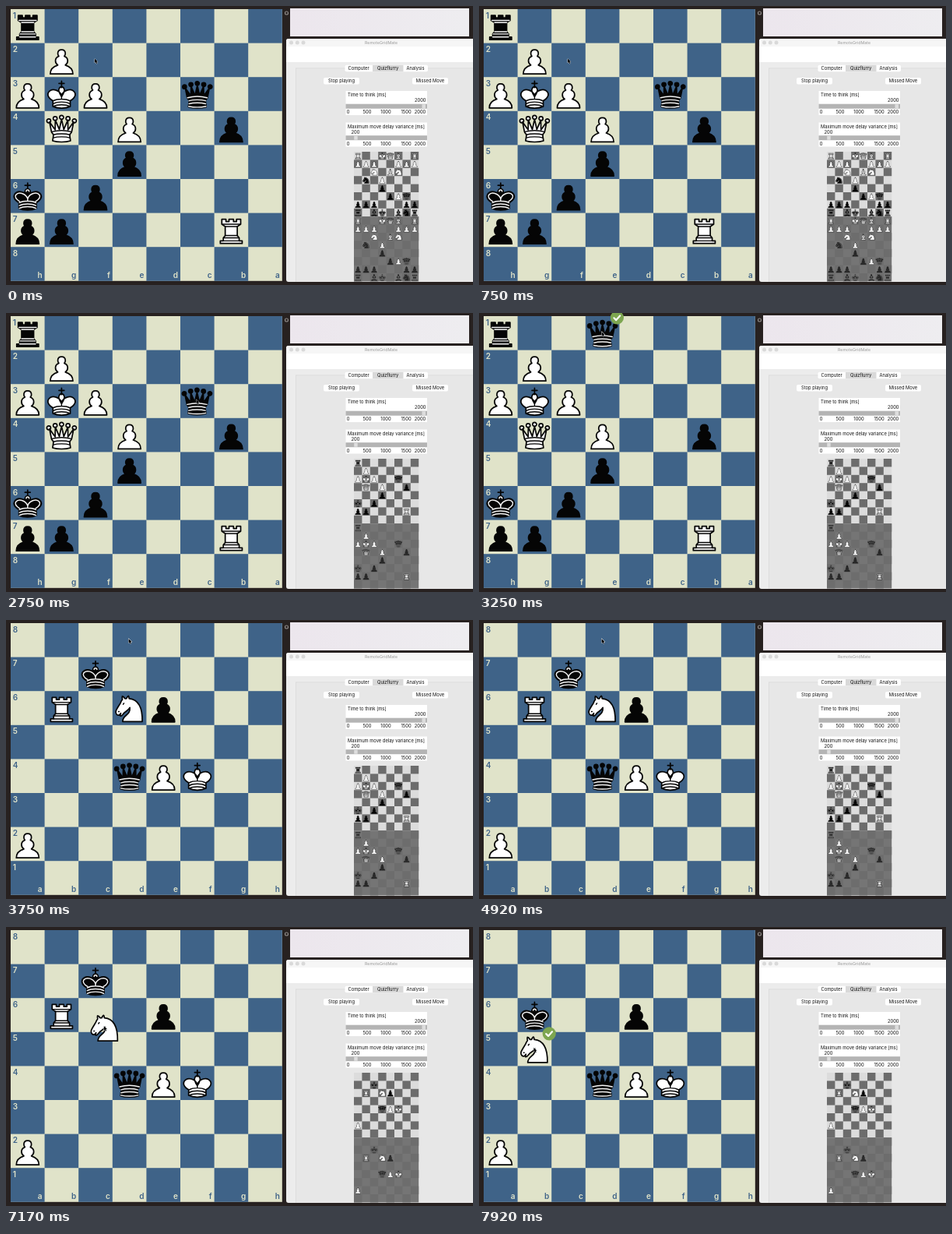
An HTML page with a canvas for the animation above (8000 ms loop, 600 by 358 pixels).

```html
<!DOCTYPE html>
<html lang="en">
<head>
<meta charset="utf-8">
<title>Chess helper</title>
<style>
  html, body { margin: 0; width: 100%; height: 100%; overflow: hidden; background: #272120; }
  canvas { display: block; width: 600px; height: 358px; }
</style>
</head>
<body>
<canvas id="stage" width="600" height="358"></canvas>
<script>
const ctx = document.getElementById('stage').getContext('2d');
const LOOP = 8000;
const BOARD = { x: 6, y: 4, cell: 43.6 };
const LIGHT = '#e0e3c9', BLUE = '#3f6388';
const FONT = 'Inter, "Liberation Sans", sans-serif';

const OPENING = 'R2KQB1R/PPP2PPP/2N1BN2/1n1P4/3p4/4pPq1/ppp3pp/r1bk1bnr';
const FIRST = 'r7/1P6/PKP2q2/1Q1P2p1/3p4/k1p5/pp4R1/8';
const SECOND = '8/2k5/1R1Np3/8/3qPK2/8/P7/8';

// Piece outlines on a 45 unit square: body, lines on both colours, lines on black only.
const ball = (x, y, r = 2.6) => `M${x - r},${y}a${r},${r} 0 1 0 ${2 * r},0a${r},${r} 0 1 0 ${-2 * r},0Z`;
const piece = (body, lines = '', blackLines = '') =>
  ({ body: new Path2D(body), lines: new Path2D(lines), blackLines: new Path2D(blackLines) });
const PIECES = {
  p: piece('M22.5,8C19.5,8 17.5,10 17.5,13C17.5,14.3 18,15.5 18.9,16.4C16,17.6 14.4,20 14.4,22.6C14.4,25 15.6,27 17.5,28.2C11.5,30 7.5,33.5 7.5,40H37.5C37.5,33.5 33.5,30 27.5,28.2C29.4,27 30.6,25 30.6,22.6C30.6,20 29,17.6 26.1,16.4C27,15.5 27.5,14.3 27.5,13C27.5,10 25.5,8 22.5,8Z'),
  r: piece('M8,39.5V36H12V32L14.5,29V17L10,14V7.5H15.5V10.5H19.5V7.5H25.5V10.5H29.5V7.5H35V14L30.5,17V29L33,32V36H37V39.5Z',
    'M12,36H33M12.5,32H32.5M14.5,29H30.5M14.5,17H30.5M11,14H34'),
  n: piece('M22,9C33,10 40,18 39.5,39.5H13.5C13.5,30 24,32 23,21C21,25 17,26 15.5,28C13.5,30 12.5,32.5 10.5,32C9.5,31 11.5,29 11,28.5L9,31C6,31.5 4,29 4.5,26C5,23 11,15 11,14C11.5,12 13,11 13.2,10C12.5,9 12.8,7 13,6C14.5,6 16.5,9 16.5,9H18.5C18.5,9 19.5,6.5 21,5.5C22,6 22,9 22,9Z',
    'M8,26.3h.8M14.2,16.6l1-1.4', 'M25,11C33,13 37,20 36.5,38'),
  b: piece(ball(22.5, 7.5) + 'M22.5,10.5C11.5,15 12,25 17.5,26.5L15,32C17,36 10,37 6.5,37L8,40C13,40 20,40 22.5,37.5C25,40 32,40 37,40L38.5,37C35,37 28,36 30,32L27.5,26.5C33,25 33.5,15 22.5,10.5Z',
    'M17.5,26.5H27.5M15.5,31H29.5M22.5,15.5V22M19.5,18.5H25.5'),
  q: piece('M9,26L6.5,13.5L14,24L14.2,11L19.5,23.5L22.5,10L25.5,23.5L30.8,11L31,24L38.5,13.5L36,26C36,28 34.5,28 33.5,30C33,33 34,34 34.3,38.5C28,40.6 17,40.6 10.7,38.5C11,34 12,33 11.5,30C10.5,28 9,28 9,26Z' +
    [[5.5, 12], [14, 9], [22.5, 7.5], [31, 9], [39.5, 12]].map(c => ball(...c)).join(''),
    'M9.5,26.5C17,24.5 28,24.5 35.5,26.5M11.5,30.5C17,28.8 28,28.8 33.5,30.5M11.5,34.5C17,32.8 28,32.8 33.5,34.5',
    'M11,37.8C18,39.3 27,39.3 34,37.8'),
  k: piece('M22.5,13V4.5M19,7.5H26M22.5,25C22.5,25 27.5,17.5 25.8,14.5C25.8,14.5 24.8,12 22.5,12C20.2,12 19.2,14.5 19.2,14.5C17.5,17.5 22.5,25 22.5,25ZM11,38C17,41 28,41 34,38V30.5C34,30.5 43,26 40,19.5C35.5,13 25,16 22.5,23.5C20,16 9.5,13 5,19.5C2,26 11,30.5 11,30.5Z',
    'M11.5,30.5C17,27.5 28,27.5 33.5,30.5M11.5,34.3C17,31.3 28,31.3 33.5,34.3M11.5,38C17,35 28,35 33.5,38M22.5,23.5V27.5',
    'M33,28.8C36,27 40.2,24 38.2,20.2C34.5,15.5 25.5,18 22.5,25C19.5,18 10.5,15.5 6.8,20.2C4.8,24 9,27 12,28.8M20.6,15.5C20.6,13 24.4,13 24.4,15.5')
};

const rect = (color, x, y, w, h) => { ctx.fillStyle = color; ctx.fillRect(x, y, w, h); };
const round = (color, x, y, w, h, r) => {
  ctx.fillStyle = color;
  ctx.beginPath();
  ctx.roundRect(x, y, w, h, r);
  ctx.fill();
};
const disc = (color, x, y, r) => round(color, x - r, y - r, 2 * r, 2 * r, r);
const text = (str, x, y, size = 5.8, align = 'center', color = '#111', weight = 400) => {
  ctx.font = `${weight} ${size}px ${FONT}`;
  ctx.textAlign = align;
  ctx.textBaseline = 'middle';
  ctx.fillStyle = color;
  ctx.fillText(str, x, y);
};

function parse(fen) {
  return fen.split('/').flatMap((row, y) => {
    let x = 0;
    const found = [];
    for (const ch of row) {
      if (+ch) x += +ch;
      else found.push({ type: ch, x: x++, y });
    }
    return found;
  });
}

function drawPiece({ type, x, y }, board) {
  const kind = type.toLowerCase(), black = type === kind, shape = PIECES[kind];
  const scale = board.cell / 45;
  ctx.save();
  ctx.translate(board.x + x * board.cell, board.y + (y + .02) * board.cell);
  ctx.scale(scale, scale);
  ctx.lineJoin = ctx.lineCap = 'round';
  ctx.lineWidth = 1.8;
  ctx.fillStyle = black ? '#050505' : '#fff';
  ctx.strokeStyle = '#050505';
  ctx.fill(shape.body);
  ctx.stroke(shape.body);
  ctx.lineWidth = 1.5;
  if (black) ctx.strokeStyle = '#f4f4f4';
  ctx.stroke(shape.lines);
  if (black) ctx.stroke(shape.blackLines);
  ctx.restore();
}

function drawSquares(board, light, dark) {
  rect(light, board.x, board.y, 8 * board.cell, 8 * board.cell);
  for (let i = 0; i < 64; i++) {
    const x = i % 8, y = i >> 3;
    if ((x + y) % 2) rect(dark, board.x + x * board.cell, board.y + y * board.cell, board.cell, board.cell);
  }
}

const progress = (t, start, end) => Math.min(1, Math.max(0, (t - start) / (end - start)));
const between = (from, to, k) => from.map((v, i) => v + (to[i] - v) * k);

// Slides the piece on one cell to another and takes what stood there.
function move(pieces, from, to, k) {
  if (!k) return pieces;
  const at = (p, c) => p.x === c[0] && p.y === c[1];
  const moving = pieces.find(p => at(p, from));
  const rest = pieces.filter(p => p !== moving && !(k === 1 && at(p, to)));
  const [x, y] = between(from, to, k);
  return [...rest, { ...moving, x, y }];
}

function drawBadge(x, y) {
  const cx = BOARD.x + (x + 1) * BOARD.cell - 3, cy = BOARD.y + y * BOARD.cell + 2;
  disc('#7da650', cx, cy, 8.6);
  ctx.strokeStyle = '#fff';
  ctx.lineWidth = 2.2;
  ctx.lineCap = ctx.lineJoin = 'round';
  ctx.stroke(new Path2D(`M${cx - 4},${cy + .3}l2.8,2.8l5,-5.6`));
}

function drawCursor([x, y]) {
  const px = BOARD.x + (x + .5) * BOARD.cell - 1, py = BOARD.y + (y + .5) * BOARD.cell - 1.6;
  const arrow = new Path2D(`M${px},${py}v5.2l1.2,-1l1,2l1,-.5l-.9,-1.9h1.7Z`);
  ctx.strokeStyle = '#d8dce0';
  ctx.lineWidth = .9;
  ctx.stroke(arrow);
  ctx.fillStyle = '#000';
  ctx.fill(arrow);
}

function drawBoard(t) {
  const second = t >= 3420;
  const queenDrag = progress(t, 2750, 3000), knightDrag = progress(t, 7080, 7330);
  drawSquares(BOARD, LIGHT, BLUE);
  for (let i = 0; i < 8; i++) {
    text(second ? 8 - i : i + 1, BOARD.x + 2.8, BOARD.y + i * BOARD.cell + 8.5, 10, 'left', i % 2 ? LIGHT : BLUE, 600);
    text('abcdefgh'[second ? i : 7 - i], BOARD.x + (i + 1) * BOARD.cell - 3, BOARD.y + 342, 10, 'right', i % 2 ? BLUE : LIGHT, 600);
  }
  let pieces;
  if (second) {
    pieces = move(parse(SECOND), [3, 2], [1, 3], knightDrag);
    pieces = move(pieces, [2, 1], [1, 2], progress(t, 7580, 7750));
  } else {
    pieces = move(parse(FIRST), [5, 2], [3, 0], queenDrag);
  }
  pieces.forEach(p => drawPiece(p, BOARD));
  if (t >= 3080 && !second) drawBadge(3, 0);
  if (t >= 7420) drawBadge(1, 3);

  if (t < 2420) drawCursor([2, 1]);
  else if (t < 6750) drawCursor(between([5, 2], [3, 0], queenDrag));
  else drawCursor(between([3, 2], [1, 3], knightDrag));
}

function drawSlider(y, label, value, share) {
  rect('#fff', 436.5, y, 104.5, 31);
  text(label, 439, y + 5.3, 5.8, 'left');
  text(value, 449 + (share - .1) * 92.5, y + 12.7);
  rect('#b4b4b4', 436.5, y + 16.7, 104.5, 6);
  rect('#dedede', 437.5 + share * 97, y + 17.2, 4.5, 5);
  [439.5, 464, 488, 514, 532].forEach((x, i) => text(i * 500, x, y + 27.3));
}

function drawPreview(t) {
  if ((t >= 2330 && t < 2420) || (t >= 6670 && t < 6750)) {
    rect('#fff', 446, 185, 85.5, 169);
    return;
  }
  const pieces = parse(t < 2330 ? OPENING : t < 6670 ? FIRST : SECOND);
  const top = { x: 447, y: 187, cell: 10.4 }, bottom = { ...top, y: 270.2 };
  drawSquares(top, '#dcdcdc', '#6c6c6c');
  drawSquares(bottom, '#757575', '#6d6d6d');
  for (const p of pieces) {
    drawPiece(p, top);
    ctx.globalAlpha = p.type > 'Z' ? .65 : .95;
    drawPiece(p, bottom);
    ctx.globalAlpha = 1;
  }
}

function drawWindow(t) {
  const haze = ctx.createLinearGradient(365, 0, 595, 0);
  haze.addColorStop(0, '#ece6ed');
  haze.addColorStop(1, '#eeedf0');
  rect(haze, 365, 3, 230, 36);
  ctx.strokeStyle = '#8b8785';
  ctx.lineWidth = 1.2;
  ctx.stroke(new Path2D(ball(360.5, 9, 2)));

  round('#ececec', 360, 42, 244, 312, 3);
  round('#f6f6f6', 360, 42, 244, 10, [3, 3, 0, 0]);
  rect('#fff', 360, 52, 240, 20);
  [366.5, 374.3, 382].forEach(x => disc('#d9d9d9', x, 47, 2.5));
  text('RemoteGridMate', 482, 47, 5.3, 'center', '#999');
  rect('#d9d9d9', 372, 79.5, 228, 274.5);
  rect('#e7e7e7', 372.7, 80.2, 228, 273.8);

  round('#fff', 435.5, 75.8, 106.5, 8.4, 2);
  rect('#d9d9d9', 471, 75.8, 39.5, 8.4);
  text('Computer', 453, 80);
  text('Quizflurry', 490.7, 80);
  text('Analysis', 526, 80);
  round('#fff', 408, 92, 46, 8.6, 2);
  round('#fff', 522, 92, 46, 8.6, 2);
  text('Stop playing', 431, 96.3);
  text('Missed Move', 545, 96.3);
  drawSlider(109, 'Time to think [ms]', 2000, 1);
  drawSlider(149.5, 'Maximum move delay variance [ms]', 200, .1);
  drawPreview(t);
}

function frame(now) {
  const t = now % LOOP;
  rect('#272120', 0, 0, 600, 358);
  drawWindow(t);
  drawBoard(t);
  requestAnimationFrame(frame);
}
requestAnimationFrame(frame);
</script>
</body>
</html>
```
